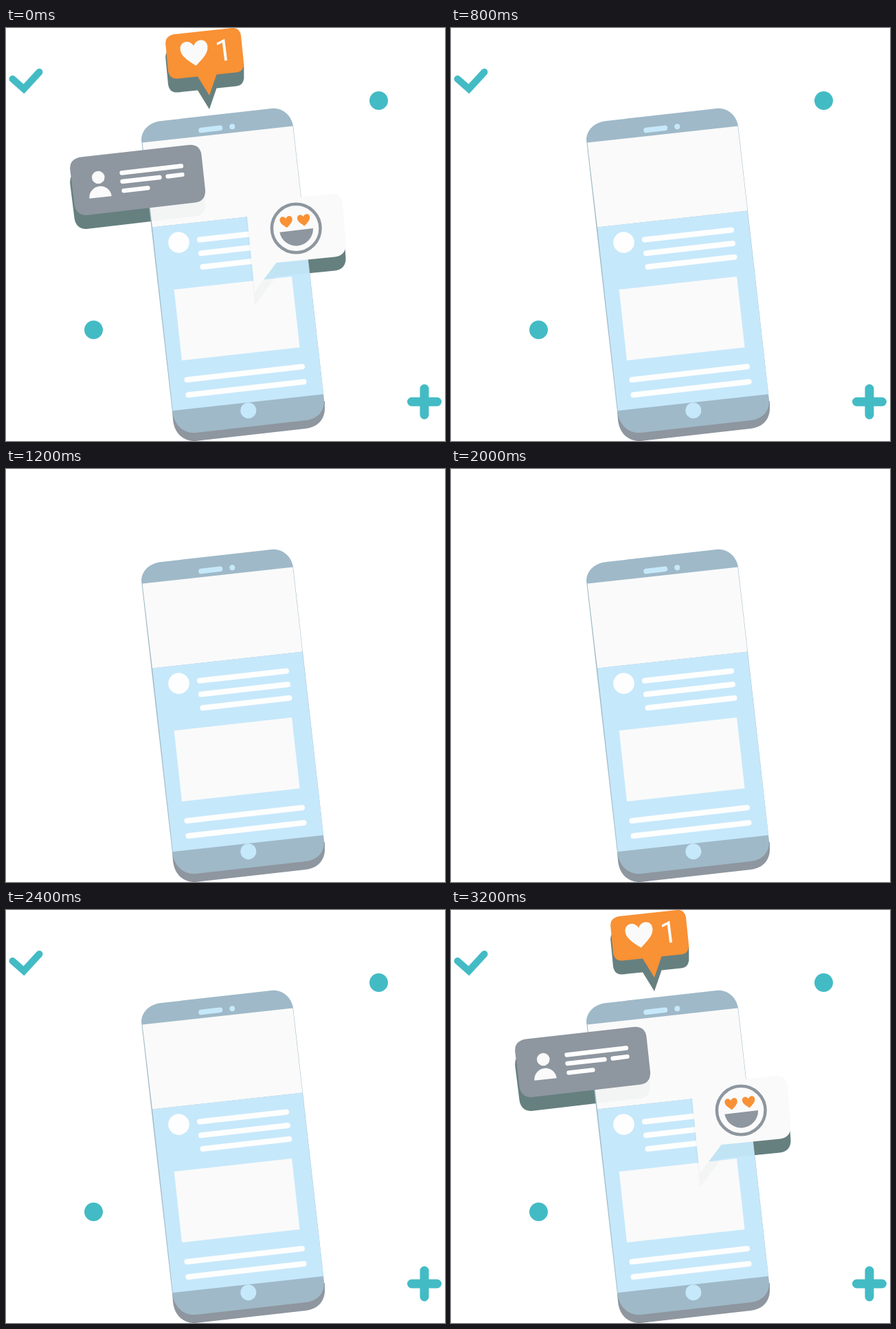
An HTML page for the animation above (3600 ms loop, 639 px wide and 600 px high).

```html
<!DOCTYPE html>
<html lang="en">
<head>
<meta charset="utf-8">
<title>Phone notifications</title>
<style>
  html, body { margin: 0; width: 100%; height: 100%; overflow: hidden; background: #fff; }
  svg { display: block; width: 639px; height: 600px; }
  .teal { fill: #43bbc5; }
  .tealLine { fill: none; stroke: #43bbc5; stroke-linecap: round; }
  .steel { fill: #9fb9c8; }
  .sky { fill: #c6e8fb; }
  .paper { fill: #fafafa; }
  .grey { fill: #8e969f; }
  .orange { fill: #f99135; }
  .dark { fill: #66807f; }
  .lines { fill: none; stroke: #fefefe; stroke-linecap: round; }
  text { font: 400 44px Roboto, Inter, sans-serif; }
</style>
</head>
<body>
<svg viewBox="0 0 639 600">
  <defs>
    <path id="body" d="M197 162C198 147 209 137 226 135L386 117C402 115.500 415 126 418 142L463 540C464 556 454 568 436 570L276 588C258 589 245 577 242 557Z"/>
    <path id="like" d="M246 9L329 0Q340 -1 342 11L346 50Q347 63 335 64.500L306.500 67.500L296 98L279 70.500L250 73.500Q238 74.500 236 62L232.300 24Q231 11 246 9Z"/>
    <path id="card" d="M109 187.500L265 170Q282 168 284.500 184L290 235Q291 251 276 253.500L119 271.800Q102 273 99.500 256L93.300 206Q92 190 109 187.500Z"/>
    <path id="reply" d="M349 254.500L472 241Q488 240 490 255L494.500 314Q495 330 479 332.500L393.500 341L362 383Z"/>
    <path id="heart" d="M0 18C-8 11 -20 3 -20 -8C-20 -20 -5 -22 0 -11C5 -22 20 -20 20 -8C20 3 8 11 0 18Z"/>
    <clipPath id="onPhone"><use href="#body"/></clipPath>
  </defs>

  <g data-until="3">
    <path class="tealLine" stroke-width="10" d="M9.500 74L26 88.500L48.500 64"/>
    <path class="tealLine" stroke-width="13" d="M590.500 543H627.500M609 524V562"/>
    <circle class="teal" cx="542.500" cy="105.500" r="13.500"/>
    <circle class="teal" cx="127.500" cy="438.500" r="13.500"/>
  </g>

  <g class="dark" data-until="2">
    <use href="#like" y="20"/>
    <path d="M333 60L346.300 52V74L330 80Z"/>
    <use href="#card" y="20"/>
    <use href="#reply" y="20"/>
  </g>

  <path class="grey" d="M242 556L243 569C245 589 258 601 276 600L436 582C454 580 464 568 464 553V542Z"/>
  <use href="#body" class="steel"/>
  <path class="paper" d="M198.500 166.500L417.500 142.500L431.500 265.500L213 289.500Z"/>
  <path class="sky" d="M213 289.500L431.500 265.500L462 532L242.800 556Z"/>
  <path d="M284 148.500L311.500 145.300" fill="none" stroke="#c6e8fb" stroke-width="7.500" stroke-linecap="round"/>
  <circle class="sky" cx="329.300" cy="143.300" r="4"/>
  <circle class="sky" cx="352.800" cy="555.700" r="11.500"/>

  <g data-until="4">
    <circle cx="251.500" cy="311.500" r="15.300" fill="#fefefe"/>
    <path class="paper" d="M244.700 380L416 361L427.500 464L256 483Z"/>
    <path class="lines" stroke-width="8" d="M282 307.500L408 293.500M284 327.300L410 313M286.500 347L412.500 332.700M263.500 511L431 492M265.500 533L433.500 514"/>
  </g>

  <g data-until="2">
    <g clip-path="url(#onPhone)" class="dark" opacity=".045">
      <use href="#card" y="20"/>
      <use href="#reply" y="20"/>
    </g>
    <use href="#like" class="orange"/>
    <use href="#card" class="grey"/>
    <use href="#reply" class="paper"/>
    <circle class="paper" cx="134.300" cy="217" r="9.300"/>
    <path class="paper" d="M121.500 247.800A16.200 16.200 0 0 1 153.700 244.200Z"/>
    <circle cx="422.200" cy="291" r="35.300" fill="#fafafa" stroke="#8e969f" stroke-width="4.500"/>
    <path class="grey" d="M398.300 296.700A24.600 24.600 0 0 0 447 291Z"/>
  </g>

  <g data-until="1">
    <path class="lines" stroke-width="6.300" d="M168.500 210.500L255 200.500M169.500 223L223.500 217M235.500 215.700L256.500 213M171.500 236.300L206.500 232.300"/>
    <use href="#heart" class="paper" transform="translate(274.500 37) rotate(-7)"/>
    <text class="paper" transform="translate(306.500 49) rotate(-7)">1</text>
    <use href="#heart" class="orange" transform="translate(408 282) rotate(-7) scale(.46)"/>
    <use href="#heart" class="orange" transform="translate(433.500 279.200) rotate(-7) scale(.46)"/>
  </g>
</svg>
<script>
  const STEP = 400, STEPS = 9;
  const layers = [...document.querySelectorAll("[data-until]")];

  // Layers vanish one step at a time, then return in reverse order.
  function render(time) {
    const step = Math.floor(time / STEP) % STEPS;
    const stage = Math.min(step, STEPS - 1 - step);
    for (const layer of layers) {
      layer.style.display = stage < +layer.dataset.until ? "" : "none";
    }
  }

  const start = performance.now();
  function tick() {
    render(performance.now() - start);
    requestAnimationFrame(tick);
  }
  tick();
</script>
</body>
</html>
```
